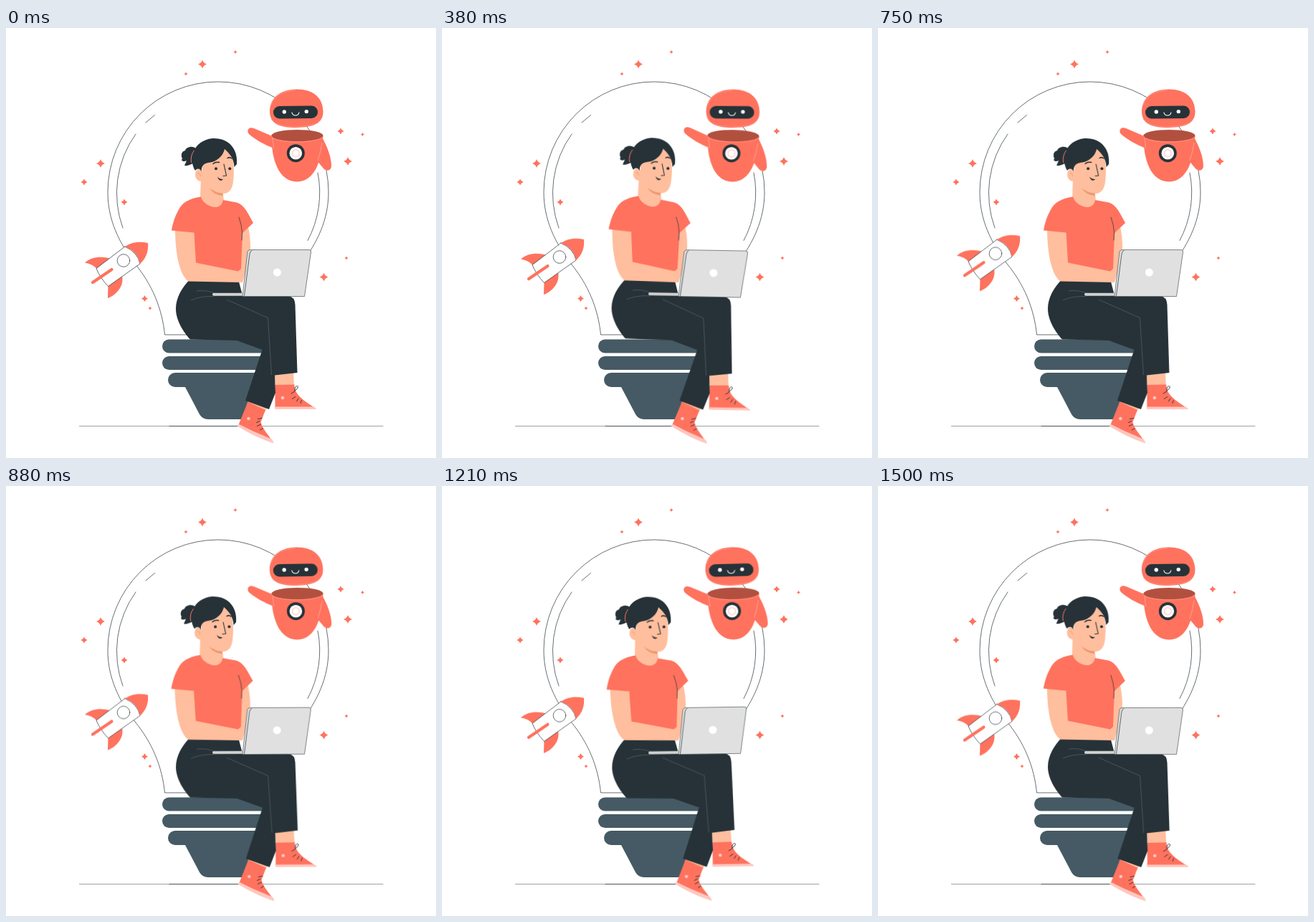
An HTML page that plays this animation: 600 by 600 pixels, repeating every 1540 ms.

```html
<!DOCTYPE html>
<html lang="en">
<head>
<meta charset="utf-8">
<title>Bright idea</title>
<style>
  html, body { margin: 0; width: 100%; height: 100%; overflow: hidden; background: #fff; }
  svg { display: block; width: 100vw; height: 100vh; }
  .coral { fill: #ff725e; }
  .dark { fill: #263238; }
  .slate { fill: #455a64; }
  .skin { fill: #ffbe9d; }
  .white { fill: #fff; }
  .sole { fill: #ffc7bf; }
  .line { fill: none; stroke: #263238; stroke-width: .7; stroke-linecap: round; stroke-linejoin: round; }
  .bold { stroke-width: 1.1; }
  .lace { stroke-width: .9; }
  .seam { fill: none; stroke: #56636a; stroke-width: .7; }
  .sway { animation: sway 1540ms linear infinite; }
  .woman { transform-origin: 332px 370px; }
  .robot { transform-origin: 395px 150px; }
  .rocket { animation: hover 1540ms linear infinite; }
  @keyframes sway {
    0%, 100% { transform: rotate(0deg); }
    25% { transform: rotate(1deg); }
    75% { transform: rotate(-1deg); }
  }
  @keyframes hover {
    0%, 100% { transform: translateY(0); }
    50% { transform: translateY(-10px); }
  }
</style>
</head>
<body>
<svg viewBox="0 0 600 600">
  <defs>
    <path id="star" class="coral" d="M0-1Q.23-.23 1 0Q.23.23 0 1Q-.23.23-1 0Q-.23-.23 0-1Z"/>
  </defs>

  <path class="line" stroke-opacity=".65" d="M102.500 555.500H526"/>
  <path class="line" d="M228 555.500H345"/>

  <g class="bulb">
    <path class="line" d="M252 428H221.500C218 392 204 358 180 329C158 300 142 268 142 229A154 154 0 0 1 450 229C450 268 434 300 412 329"/>
    <path class="line" d="M181 148A141 141 0 0 0 163 279M421 296.500A141 141 0 0 0 435 202M195 132L207.500 121.500"/>
    <g class="slate">
      <path d="M227.500 434.500H350L362 453.500H227.500A9.500 9.500 0 0 1 227.500 434.500Z"/>
      <path d="M227.500 458H362V477H227.500A9.500 9.500 0 0 1 227.500 458Z"/>
      <path d="M236 481H352V501L336 546H282Q274 546 270 539L250 501H236A10 10 0 0 1 236 481Z"/>
    </g>
  </g>

  <g id="stars"></g>

  <g class="rocket">
    <path class="coral" d="M110 327.500C119 319 134 318 146 322L127 336.500Q121 329 110 327.500Z"/>
    <path class="coral" d="M142 377L142.500 360L162 346C165 359 155 372 142 377Z"/>
    <path class="line" style="fill:#fff" d="M166 305L126 335.500Q131 348 142.500 360.500L187 329Q184 313 166 305Z"/>
    <path class="coral" d="M198 300C184 297 173 300 165.500 305.500C177 308 186 318 186.500 329.500C196 321 199 311 198 300Z"/>
    <circle class="line" cx="164" cy="324.500" r="8.800"/>
    <path d="M121 355L147.500 337" fill="none" stroke="#ff725e" stroke-width="4.200" stroke-linecap="round"/>
  </g>

  <g class="sway robot">
    <path class="coral" d="M374 152L346 140C339 137 335 143 339 148C348 156 361 163 374 168Z"/>
    <path class="coral" d="M440 151C449 166 454 181 454 193C453 200 447 200 443 196L433 184Z"/>
    <path class="coral" d="M370.500 149C370 183 380 214 406 214.500C432 214 441 183 442.500 150Z"/>
    <path d="M372 154Q373 161 373.500 168M441 160Q439 174 435 185" fill="none" stroke="#ffb0a4" stroke-width=".7"/>
    <ellipse cx="406.500" cy="150" rx="36" ry="8" fill="#b2503f"/>
    <path d="M370.500 151A36 8 0 0 0 442.500 151" fill="none" stroke="#ff9a8a" stroke-width=".8"/>
    <circle class="dark" cx="404.300" cy="174.700" r="12.500"/>
    <circle class="white" cx="404.300" cy="174.700" r="8.800"/>
    <path d="M404.300 169.500L409 172V177.500L404.300 180L399.700 177.500V172Z" fill="none" stroke="#ffb0a4" stroke-width=".8"/>
    <path class="coral" d="M405 85.500C427 85 442 96 442.500 116C443 134 428 138.500 405 139C382 139 368 134 368 116C368.500 97 383 86 405 85.500Z"/>
    <path d="M370 108C374 94 386 88 404 87" fill="none" stroke="#ff9a8a" stroke-width=".8"/>
    <path d="M370 127C375 136 390 137.500 405 137.500C422 137 435 135 440 126" fill="none" stroke="#ff9a8a" stroke-width=".6"/>
    <rect class="dark" x="373" y="108.800" width="62" height="17.400" rx="8.700" transform="rotate(-.6 404 117.500)"/>
    <circle class="white" cx="388.300" cy="117" r="2.700"/>
    <circle class="white" cx="419.300" cy="116.600" r="2.700"/>
    <path d="M398.800 117.500C400 123.500 408 123.500 409 117.500" fill="none" stroke="#fff" stroke-width="1.100"/>
  </g>

  <g class="sway woman">
    <!-- far leg -->
    <path class="skin" d="M340 514L366 526L361 536L336 526Z"/>
    <path class="coral" d="M337.500 521.500L362 533L355.500 550C358 560 368 570 373 578L324 555Z"/>
    <path class="sole" d="M324.500 552.500C340 561 358 568 371.500 574L373.500 579.500C356 574 338 565 323 555.500Z"/>
    <path class="line lace" d="M351.500 545.500L357 544.500M349.500 550.500L354 548.500M350.500 555.500L355.500 553M354.500 561L358.500 558.500"/>
    <circle class="sole" cx="338.500" cy="545" r="2.300"/>
    <!-- near foot -->
    <path class="skin" d="M374 480H401L402 499H376Z"/>
    <path class="coral" d="M375.500 498L402.500 497.500C402 512 416 520 432.500 531H375.500Z"/>
    <path class="sole" d="M375.500 528.500H429.500Q432 529.500 433 532H375.500Z"/>
    <path class="line lace" d="M398 510L403 507M399.500 517.500L404 514.500M405.500 521L408 517M411 523.500L412.500 519.500M403 506C402 500 407 498 407.500 501Q407 504 403 506"/>
    <circle class="sole" cx="386" cy="516" r="2.300"/>

    <path class="dark" d="M255 352.500L325 354L330 373L394 374Q403 375 403.500 386L406.500 481L375 484.500L376 509L367 532L334 520L357.500 449L322 436L257 434.500C248 425 237 408 237 392C237 376 246 362 255 352.500Z"/>
    <path class="seam" d="M308 379L365.500 404.500L370.500 484M258 380Q270 374 290 374.500M266 367Q278 365 291 370"/>

    <!-- arms and shirt -->
    <path class="skin" d="M236 280C236 310 241 344 254.500 353.500L330 355L340 320C342 305 341 290 337.500 276L322 290L322 330L270 322L270 280Z"/>
    <path class="skin" d="M272 205L271 238C276 246 280 250 286 251.500C294 253 301 252 304 242L302 220Z"/>
    <path class="coral" d="M272 235.500C260 237.500 249 241 243 250C236 261 232.500 273 231 282.500L262.500 285.500L265 327.500L324 339.500L328 336L330 286L345 272C338 259 332 246 322 243.500L303 240C301 250 293 251.500 286 249C278 246 273.500 241 272 235.500Z"/>
    <path class="line" d="M325 264Q329 275 329.500 285L329 296"/>

    <!-- head -->
    <path class="dark" d="M264 187C258 182 262 170 266 169C261 163 251 166 250 171C244 172 244 179 246 182C243 186 249 187 252 185L249 192C255 193 260 189 264 187Z"/>
    <path class="skin" d="M274 182C283 168 302 164 312 174C318 181 319 200 317 214C316 225 311 231 303 231C293 231 285 227 280 221L274 214C266 215 262 207 265 200C267 196 272 196 274 200Z"/>
    <path d="M284 223.500Q292 230 302.500 230.500L302.500 234Q290 233 284 223.500Z" fill="#eb996e"/>
    <path class="dark" d="M264 199C254 183 261 157 288 154C311 153 324 169 322 190L318.500 194C318 182 312 175 305 169C303 178 295 186 285 187.500C276 188 272 193 273 200C270 195 266 196 264 199Z"/>
    <path d="M262.500 171Q257 178 258.500 188" fill="none" stroke="#ff725e" stroke-width="1"/>
    <path d="M267 203Q271 201 271.500 207" fill="none" stroke="#eb996e" stroke-width=".8"/>
    <path class="line" style="stroke-width:1.500" d="M289 189.500Q292 186.500 297.500 187.500M309 181.500Q312 179.500 315 182"/>
    <circle class="dark" cx="293" cy="196.300" r="2"/>
    <circle class="dark" cx="312.300" cy="196.300" r="2"/>
    <path class="line bold" d="M304 190L307.500 206L303 206.500"/>
    <path class="dark" d="M295 207.500Q298 211 303 211Q298 216 295 207.500Z"/>

    <!-- laptop -->
    <path d="M290 371.800H332" fill="none" stroke="#d2d2d2" stroke-width="4" stroke-linecap="round"/>
    <path d="M337 312Q338 309.500 341 309.500H423Q426 309.500 425.500 313L416.500 374.500H330Z" fill="#e0e0e0" stroke="#4d565a" stroke-width=".7"/>
    <path class="line" d="M343 310.500Q341 311 340 315L332.500 374"/>
    <circle class="white" cx="378.300" cy="341" r="5.500"/>
  </g>
</svg>
<script>
  const spots = {
    6: [[274, 50.5], [132, 189], [477, 186], [443.5, 347.5]],
    4.5: [[109, 215], [165, 243], [467, 144], [193.5, 377.5]],
    2.5: [[320, 33.5], [251, 64], [497.5, 148.5], [475, 321], [201, 391]]
  };
  document.getElementById('stars').innerHTML = Object.entries(spots).flatMap(([r, list]) =>
    list.map(([x, y]) => `<use href="#star" transform="translate(${x} ${y}) scale(${r})"/>`)).join('');
</script>
</body>
</html>
```
